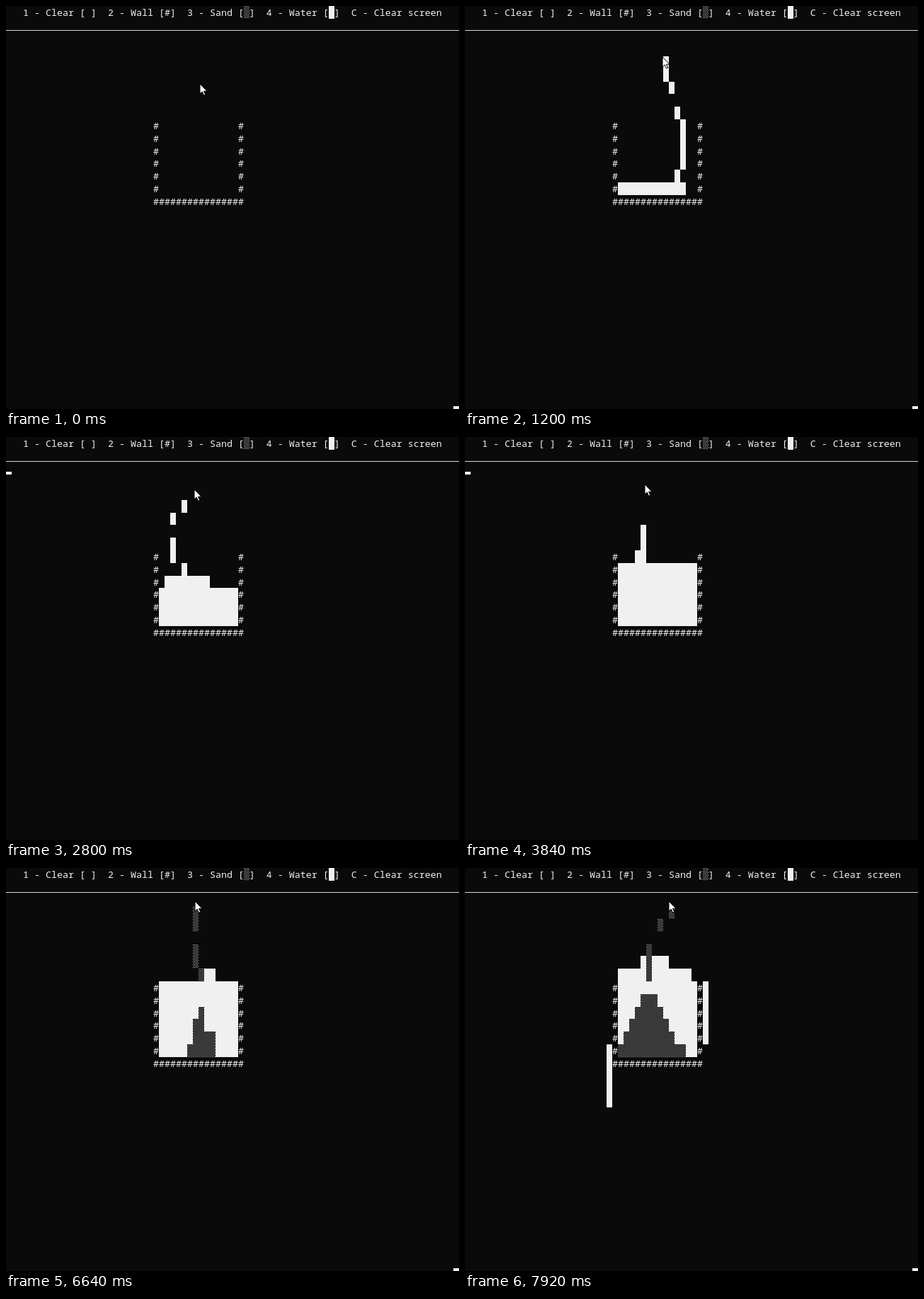
Write an HTML page with a canvas that moves like this. It is 640x569 px and loops after 8 s.

```html
<!DOCTYPE html>
<html>
<head>
<meta charset="utf-8">
<style>
html, body { margin: 0; width: 100%; height: 100%; overflow: hidden; background: #0a0a0a; }
canvas { display: block; }
</style>
</head>
<body>
<canvas id="stage" width="640" height="569"></canvas>
<script>
const ctx = document.getElementById('stage').getContext('2d');
const COLS = 80, ROWS = 32, ROW_H = 569 / ROWS;
const LEFT = 26, RIGHT = 41, RIM = 9, FLOOR = 15;
const WATER = 1, SAND = 2, WALL = 3;
const LOOP = 8000, FRAME = 80, STEP = 40;
const INK = '#f0f0f0';
const rowTop = row => Math.round(row * ROW_H);
const at = (x, y) => y * COLS + x;

// Pointer path: time, x, y
const path = [
  [0, 274, 110], [240, 270, 10], [400, 262, 72], [720, 262, 74], [880, 308, 74],
  [1000, 308, 72], [1200, 279, 72], [2200, 285, 74], [2540, 254, 72], [2600, 234, 72],
  [2720, 234, 72], [2800, 266, 74], [3000, 262, 3], [3200, 254, 66], [4160, 254, 68],
  [4320, 271, 68], [4400, 271, 68], [4640, 272, 104], [5360, 272, 104], [5560, 272, 39],
  [5720, 274, 64], [6400, 272, 66], [6800, 264, 35], [7240, 259, 64], [7280, 282, 64],
  [7400, 259, 60], [7600, 260, 35], [7840, 262, 46], [7920, 288, 47]
];

function pointer(t) {
  const i = Math.max(1, path.findIndex(p => p[0] >= t));
  const [a, b] = [path[i - 1], path[i]];
  const k = (t - a[0]) / (b[0] - a[0]);
  return [a[1] + (b[1] - a[1]) * k, a[2] + (b[2] - a[2]) * k];
}

const grid = new Uint8Array(COLS * ROWS);
const put = (kind, x, y) => { grid[at(x, y)] = kind; };
for (let y = RIM; y < FLOOR; y++) { put(WALL, LEFT, y); put(WALL, RIGHT, y); }
for (let x = LEFT; x <= RIGHT; x++) put(WALL, x, FLOOR);

// Nearest free cell in the lowest row of the tank that has room
function freeSpot(x) {
  for (let y = FLOOR - 1; y > 2; y--)
    for (let d = 0; d < RIGHT - LEFT; d++)
      for (const cx of [x - d, x + d])
        if (cx > LEFT && cx < RIGHT && !grid[at(cx, y)]) return [cx, y];
}

// Sand drops or slides diagonally, pushing water up to the surface
function moveSand(x, y, n) {
  const side = (x + n) % 2 ? 1 : -1;
  for (const dx of [0, side, -side]) {
    const below = grid[at(x + dx, y + 1)];
    if (below >= SAND) continue;
    if (below === WATER) put(WATER, ...freeSpot(x));
    put(SAND, x + dx, y + 1);
    put(0, x, y);
    return;
  }
}

function moveWater(x, y) {
  const to = grid[at(x, y + 1)] ? freeSpot(x) : [x, y + 1];
  if (to[1] <= y) return;
  put(0, x, y);
  put(WATER, ...to);
}

function sweep(kind, move, n) {
  for (let y = ROWS - 2; y > 1; y--)
    for (let x = LEFT - 6; x < RIGHT + 6; x++)
      if (grid[at(x, y)] === kind) move(x, y, n);
}

// A brimming tank spills over one wall
function spill(from, to) {
  if (grid[at(from, RIM - 1)] !== WATER) return;
  put(0, from, RIM - 1);
  put(WATER, to, RIM);
}

function step(n) {
  sweep(SAND, moveSand, n);
  sweep(WATER, moveWater, n);
  if (n > 193) spill(RIGHT - 1, RIGHT + 1);
  else if (n > 188) spill(LEFT + 1, LEFT - 1);

  const [x, y] = pointer(n * STEP);
  const col = Math.floor((x + 1) / 8);
  const row = Math.max(3, Math.floor((y + 8) / ROW_H));
  const pouring = (n > 6 && n < 70) || (n > 71 && n < 94);
  if (pouring && n % 8 !== 3) put(WATER, col, row);
  if (n > 144 && n % 4) put(SAND, col, row);
}

const states = [];
for (let n = 0; n * STEP <= LOOP - FRAME; n++) {
  step(n);
  states.push(grid.slice());
}

const dots = document.createElement('canvas');
dots.width = dots.height = 4;
const dotCtx = dots.getContext('2d');
dotCtx.fillStyle = '#c8c8c8';
for (const [x, y] of [[0, 0], [2, 0], [1, 2], [3, 2]]) dotCtx.fillRect(x, y, 1, 1);
const shade = ctx.createPattern(dots, 'repeat');

const arrow = new Path2D('M0 0V14L3.2 11L5.6 16.2L7.8 15.2L5.5 10.3H10Z');

function drawCell(kind, x, y) {
  ctx.fillStyle = kind === SAND ? shade : INK;
  if (kind === WALL) ctx.fillText('#', x * 8, rowTop(y) + 14);
  else ctx.fillRect(x * 8, rowTop(y), 8, rowTop(y + 1) - rowTop(y));
}

function draw(t) {
  ctx.fillStyle = '#0a0a0a';
  ctx.fillRect(0, 0, 640, 569);
  ctx.font = '13.333px "Noto Sans Mono", "DejaVu Sans Mono", monospace';
  ctx.fillStyle = INK;
  ctx.fillText('1 - Clear [ ]  2 - Wall [#]  3 - Sand [ ]  4 - Water [ ]  C - Clear screen', 24, 14);
  drawCell(SAND, 42, 0);
  drawCell(WATER, 57, 0);
  ctx.fillStyle = '#d8d8d8';
  ctx.fillRect(0, 34, 640, 1);

  states[t / STEP].forEach((kind, i) => {
    if (kind) drawCell(kind, i % COLS, Math.floor(i / COLS));
  });

  // Console caret hops between the first free row and the last cell
  const home = t % 1040 >= 680 || (t > 4100 && t < 5200);
  ctx.fillStyle = INK;
  if (home) ctx.fillRect(0, 49, 8, 4);
  else ctx.fillRect(632, 565, 8, 4);

  ctx.save();
  ctx.translate(...pointer(t).map(Math.round));
  ctx.fillStyle = '#fff';
  ctx.strokeStyle = '#000';
  ctx.fill(arrow);
  ctx.stroke(arrow);
  ctx.restore();
}

const start = performance.now();
function tick() {
  const t = (performance.now() - start) % LOOP;
  draw(Math.floor(t / FRAME) * FRAME);
  requestAnimationFrame(tick);
}
tick();
</script>
</body>
</html>
```
